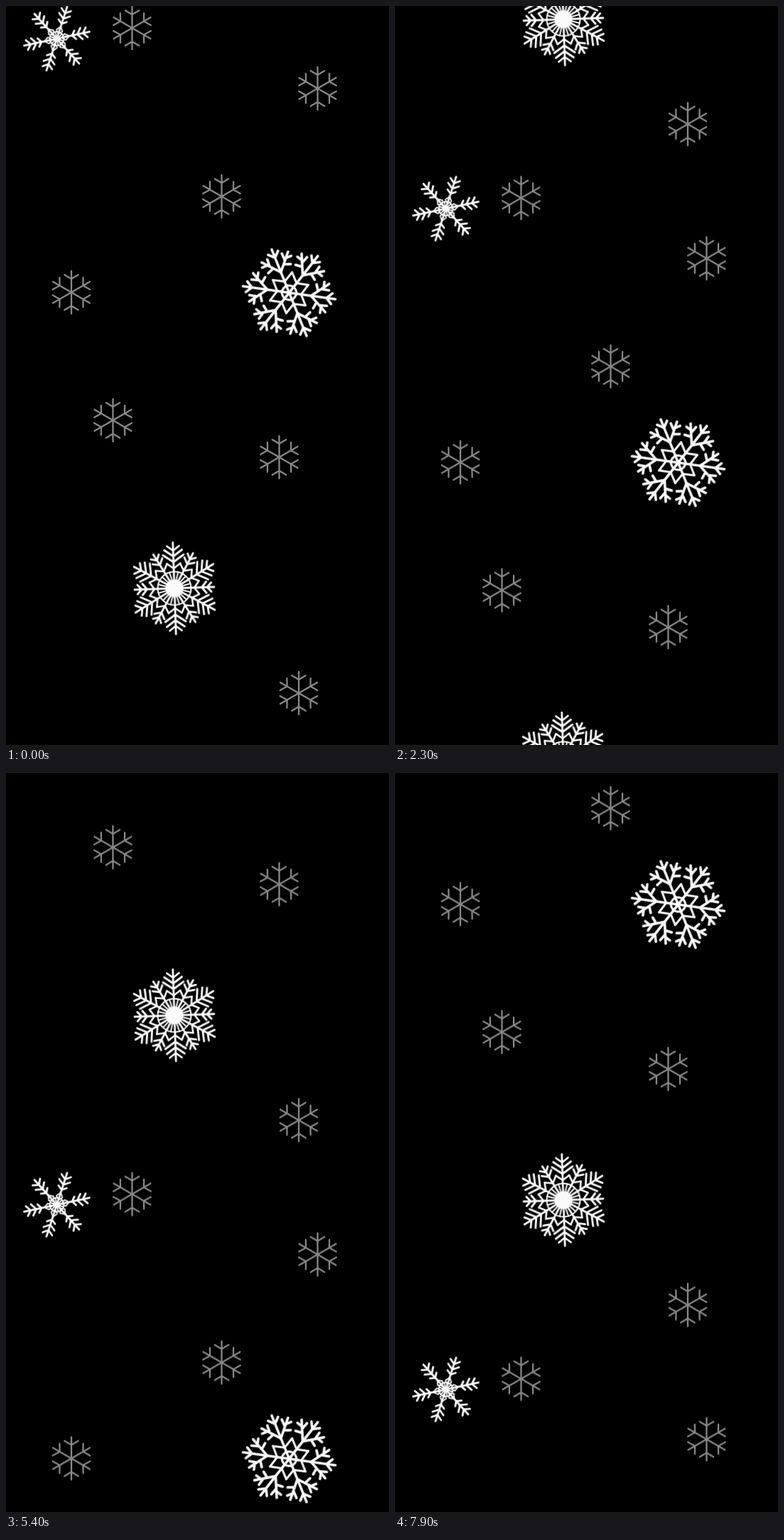
An HTML page without scripts that plays this animation: 539 by 1040 pixels, repeating every 8000 ms.

```html
<!DOCTYPE html>
<html lang="en">
<head>
<meta charset="utf-8">
<title>Snowfall</title>
<style>
  html, body { margin: 0; width: 100%; height: 100%; overflow: hidden; background: #000; }
  svg { display: block; width: 539px; height: 1040px; }
  .line { fill: none; stroke-linecap: round; stroke-linejoin: round; }
  #fall { animation: fall 8s steps(80) infinite; }
  /* one full tile takes 10 s, the loop shows 8 s of it */
  @keyframes fall { to { transform: translateY(832px); } }
</style>
</head>
<body>
<svg viewBox="0 0 539 1040">
  <defs>
    <!-- small grey flake -->
    <path id="plainArm" d="M0 0V-30M-9.7 -24.8L0 -19 9.7 -24.8"/>
    <g id="plainHalf">
      <use href="#plainArm"/>
      <use href="#plainArm" transform="rotate(60)"/>
      <use href="#plainArm" transform="rotate(120)"/>
    </g>
    <g id="plain" class="line" stroke="#888" stroke-width="2.3">
      <use href="#plainHalf"/>
      <use href="#plainHalf" transform="rotate(180)"/>
    </g>

    <!-- thin six-armed flake -->
    <g id="thinArm">
      <path d="M0 0V-47M-7 -43L0 -37.5 7 -43M-8 -35.5L0 -29.5 8 -35.5M-6 -26.5L0 -22 6 -26.5"/>
      <path stroke-width="1.8" d="M0 -7L4.5 -12 0 -18 -4.5 -12ZM0 0L5 -8.7M-5 -8.7L0 -10 5 -8.7"/>
    </g>
    <g id="thinHalf">
      <use href="#thinArm"/>
      <use href="#thinArm" transform="rotate(60)"/>
      <use href="#thinArm" transform="rotate(120)"/>
    </g>
    <g id="thin" class="line" stroke="#fafafa" stroke-width="2.8">
      <use href="#thinHalf"/>
      <use href="#thinHalf" transform="rotate(180)"/>
    </g>

    <!-- branched flake with an inner star -->
    <path id="branch" d="M0 -31L20 -54M8 -40L17 -36.5M14 -47L22 -47M11.5 -44.5L11 -55"/>
    <g id="branchedArm">
      <path d="M0 0V-65.5M-7.5 -60.5L0 -53 7.5 -60.5"/>
      <use href="#branch"/>
      <use href="#branch" transform="scale(-1 1)"/>
      <path stroke-width="3" d="M-14.5 -25.1L0 -17 14.5 -25.1M-5 -8.7L0 -11 5 -8.7"/>
    </g>
    <g id="branchedHalf">
      <use href="#branchedArm"/>
      <use href="#branchedArm" transform="rotate(60)"/>
      <use href="#branchedArm" transform="rotate(120)"/>
    </g>
    <g id="branched" class="line" stroke="#fafafa" stroke-width="3.6">
      <use href="#branchedHalf"/>
      <use href="#branchedHalf" transform="rotate(180)"/>
    </g>

    <!-- sunburst flake: long and short arms alternate -->
    <path id="notch" stroke-width="2.6" d="M-9.3 -34.8L0 -28 9.3 -34.8"/>
    <path id="ray" stroke-width="2" d="M0 0L6 -22.5"/>
    <g id="sunArm">
      <path d="M0 0V-64.5M-8.5 -59.5L0 -53 8.5 -59.5M-12.5 -54L0 -45 12.5 -54M-14.5 -47L0 -37 14.5 -47"/>
      <use href="#notch"/>
      <use href="#ray"/>
      <g transform="rotate(30)">
        <path d="M0 0V-56M-6.5 -52L0 -46 6.5 -52M-8 -45L0 -38.5 8 -45"/>
        <use href="#notch"/>
        <use href="#ray"/>
      </g>
    </g>
    <g id="sunHalf">
      <use href="#sunArm"/>
      <use href="#sunArm" transform="rotate(60)"/>
      <use href="#sunArm" transform="rotate(120)"/>
    </g>
    <g id="sun" class="line" stroke="#fafafa" stroke-width="2.8">
      <use href="#sunHalf"/>
      <use href="#sunHalf" transform="rotate(180)"/>
      <circle r="23.5" stroke-width="2"/>
      <circle r="12.5" fill="#fafafa" stroke="none"/>
    </g>

    <g id="tile">
      <use href="#plain" x="177.5" y="31"/>
      <use href="#plain" x="438.5" y="116"/>
      <use href="#plain" x="303.5" y="268"/>
      <use href="#plain" x="92" y="403"/>
      <use href="#plain" x="150.5" y="583"/>
      <use href="#plain" x="384.5" y="635"/>
      <use href="#plain" x="412" y="967"/>
      <use href="#thin" transform="translate(71.5 46) rotate(18)"/>
      <use href="#branched" transform="translate(398.5 403.5) rotate(38)"/>
      <use href="#sun" transform="translate(237 819.5) rotate(-2)"/>
    </g>
  </defs>

  <rect width="539" height="1040"/>
  <g id="fall">
    <use href="#tile"/>
    <use href="#tile" y="-1040"/>
  </g>
</svg>
</body>
</html>
```
